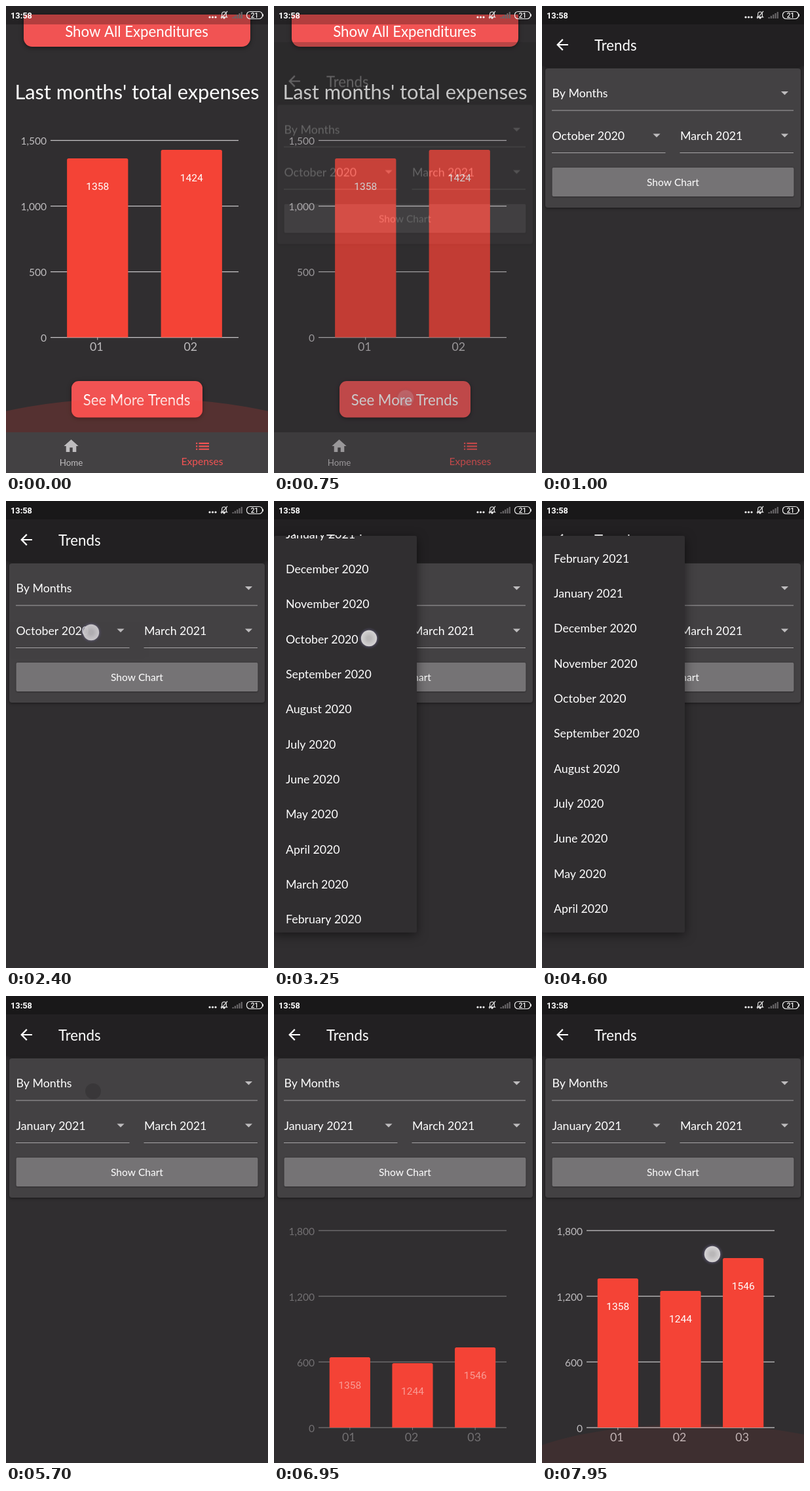
An HTML page with a canvas that plays this animation: 400 px wide and 711 px high, repeating every 8 s.

```html
<!DOCTYPE html>
<html lang="en">
<head>
<meta charset="utf-8">
<title>Expense trends</title>
<style>
  html, body { margin: 0; height: 100%; overflow: hidden; background: #302e30; }
  canvas { display: block; }
</style>
</head>
<body>
<canvas id="stage" width="400" height="711"></canvas>
<script>
const W = 400, H = 711, LOOP = 8000, DP = 400 / 360;
const BG = '#302e30', CARD = '#434143', BUTTON = '#f15353', BAR = '#f44336', GREY = '#bebcbe';
const ICONS = {
  back: 'M20 11H7.83l5.59-5.59L12 4l-8 8 8 8 1.41-1.41L7.83 13H20v-2z',
  home: 'M10 20v-6h4v6h5v-8h3L12 3 2 12h3v8z',
  list: 'M3 13h2v-2H3zm0 4h2v-2H3zm0-8h2V7H3zm4 4h14v-2H7zm0 4h14v-2H7zM7 7v2h14V7z',
  bell: 'M12 22a2 2 0 0 0 2-2h-4a2 2 0 0 0 2 2zM12 4a6 6 0 0 0-6 6v6l-2 2h16l-2-2v-6a6 6 0 0 0-6-6zM4 22L21 2'
};
const MONTHS = 'January February March April May June July August September October November December'.split(' ');

const screen = document.getElementById('stage').getContext('2d');
const buffer = Object.assign(document.createElement('canvas'), { width: W, height: H }).getContext('2d');
let g = screen;

const clamp = v => Math.max(0, Math.min(1, v));
const span = (t, a, b) => clamp((t - a) / (b - a));
const mix = (a, b, k) => a + (b - a) * k;
const smooth = k => k * k * (3 - 2 * k);

function bezier(x1, y1, x2, y2) {
  const at = (a, b, s) => 3 * a * s * (1 - s) ** 2 + 3 * b * s * s * (1 - s) + s ** 3;
  return x => {
    let lo = 0, hi = 1;
    for (let i = 0; i < 20; i++) {
      const mid = (lo + hi) / 2;
      if (at(x1, x2, mid) < x) lo = mid; else hi = mid;
    }
    return at(y1, y2, lo);
  };
}
const fastOutSlowIn = bezier(.4, 0, .2, 1), easeIn = bezier(.42, 0, 1, 1);

// Draws a group with one common opacity.
function layer(alpha, dy, draw) {
  if (alpha <= 0) return;
  g = buffer;
  g.clearRect(0, 0, W, H);
  draw();
  g = screen;
  g.save();
  g.globalAlpha = alpha;
  g.drawImage(buffer.canvas, 0, dy);
  g.restore();
}

function text(s, x, cy, dp, color = '#fff', align = 'left', family = 'Lato', weight = 400) {
  g.font = `${weight} ${dp * DP}px ${family}, sans-serif`;
  g.fillStyle = color;
  g.textAlign = align;
  g.fillText(s, x, cy + .36 * dp * DP);
}

function box(x, y, w, h, color, r = 0, shadow = 0) {
  g.save();
  g.shadowColor = 'rgba(0,0,0,.5)';
  g.shadowBlur = shadow * 2;
  g.shadowOffsetY = shadow / 2;
  g.fillStyle = color;
  g.beginPath();
  g.roundRect(x, y, w, h, r);
  g.fill();
  g.restore();
}

function icon(name, cx, cy, color, scale = DP, stroke = false) {
  g.save();
  g.translate(cx - 12 * scale, cy - 12 * scale);
  g.scale(scale, scale);
  g.fillStyle = g.strokeStyle = color;
  g.lineWidth = 2;
  const path = new Path2D(ICONS[name]);
  if (stroke) g.stroke(path); else g.fill(path);
  g.restore();
}

function chart(values, base, step, k) {
  const left = 68, width = 287, slot = width / values.length, barW = slot * .65;
  g.save();
  g.globalAlpha = k;
  for (let i = 0; i < 4; i++) {
    const y = base - i * 100;
    box(left, y - .5, width, 1.2, '#c6c4c6');
    text((i * step).toLocaleString('en-US'), 62, y + 1, 14, GREY, 'right');
  }
  g.restore();
  values.forEach((v, i) => {
    const cx = left + slot * (i + .5), top = Math.floor(base - v / step * 100 * k);
    box(cx - barW / 2, top, barW, base - top, BAR, [2.5, 2.5, 0, 0]);
    g.save();
    g.globalAlpha = k;
    box(cx - .5, base, 1, 4, '#c6c4c6');
    text('0' + (i + 1), cx - 1.5, base + 14.5, 16, GREY, 'center');
    if (base - top > 50) text(v, cx, top + 42, 14, '#fff', 'center', 'Roboto');
    g.restore();
  });
}

function overscrollGlow(cx, bottom, size, alpha) {
  if (size <= 0) return;
  g.save();
  g.beginPath();
  g.rect(0, 0, W, bottom);
  g.clip();
  g.beginPath();
  g.ellipse(cx, bottom + 100 * size, 300, 300 * size, 0, 0, 7);
  g.fillStyle = `rgba(244,67,54,${alpha})`;
  g.fill();
  g.restore();
}

function touch(x, y, k) {
  if (k <= 0) return;
  g.save();
  g.globalAlpha = k;
  const disc = (r, inner, stops) => {
    const fill = g.createRadialGradient(x, y, inner, x, y, r);
    stops.forEach((c, i) => fill.addColorStop(i, c));
    g.fillStyle = fill;
    g.beginPath();
    g.arc(x, y, r, 0, 7);
    g.fill();
  };
  disc(17, 10, ['rgba(135,130,165,.75)', 'rgba(60,55,80,0)']);
  disc(12.2, 3, ['#b9b7b8', '#d6d4d5']);
  g.restore();
}
const tap = (t, start, release, end) => span(t, start - 50, start) * (1 - span(t, release, end));

function expensesPage(t) {
  box(0, 0, W, H, BG);
  box(27, 13, 346, 49, BUTTON, [0, 0, 13, 13], 3);
  text('Show All Expenditures', 199.5, 39, 20, '#fff', 'center');
  text("Last months' total expenses", 200, 131, 27.7, '#fff', 'center');
  chart([1358, 1424], 504.5, 500, 1);
  const left = (1 - span(t, 50, 600)) ** 2;
  box(100, 571, 200, 55.5, BUTTON, 11, 3);
  text('See More Trends', 199.5, 600, 20, '#fff', 'center');
  overscrollGlow(200, 649, .26 * left, .19 * left);
  box(0, 649, W, 62, CARD);
  icon('home', 99.5, 670, GREY);
  text('Home', 99.5, 695, 12, GREY, 'center');
  icon('list', 300, 670.3, BUTTON);
  text('Expenses', 299.5, 693.5, 14, BUTTON, 'center');
}

function dropdown(label, x, y, w) {
  text(label, x, y, 16);
  box(x - .5, y + 25.5, w, 1, '#a5a3a5');
  const cx = x + w - 14;
  g.fillStyle = GREY;
  g.beginPath();
  g.moveTo(cx - 5.6, y - 3);
  g.lineTo(cx + 5.6, y - 3);
  g.lineTo(cx, y + 2.6);
  g.fill();
}

function trendsPage(t) {
  box(0, 0, W, H, BG);
  box(0, 0, W, 91, '#222022', 0, 4);
  icon('back', 31, 59, '#fff');
  text('Trends', 80, 60, 20);
  box(5, 95, 390, 212, CARD, 4, 2);
  dropdown('By Months', 15.5, 133, 369);
  dropdown(t < 5500 ? 'October 2020' : 'January 2021', 15.5, 197.5, 173.5);
  dropdown('March 2021', 211, 197.5, 173.5);
  box(15.5, 246, 369, 44, '#757375', 2, 1);
  text('Show Chart', 200, 268, 14, '#fff', 'center');
  const k = span(t, 6800, 7120);
  if (k > 0) chart([1358, 1244, 1546], 657, 600, k);
}

const MENU = { top: 53, height: 604, width: 218, row: 48 * DP, count: 27, open: 2400 };
const drag = t => smooth(span(t, 3250, 3650));
const dragY = t => mix(209, 319.5, drag(t));
const scrollAt = t => 145 - Math.max(0, dragY(t) - 229);

function menu(t) {
  const { top, height, width, row, count } = MENU;
  const progress = span(t, MENU.open, MENU.open + 300);
  const grow = fastOutSlowIn(span(progress, .25, .5));
  const y0 = mix(184, top, grow), y1 = mix(184 + row, top + height, grow);
  const scroll = scrollAt(t);
  box(0, y0, width, y1 - y0, BG, 2, 8);
  g.save();
  g.beginPath();
  g.rect(0, y0 - 1, width, y1 - y0);
  g.clip();
  const unit = .5 / (count + 1.5);
  for (let i = 0; i < count; i++) {
    const month = 26 - i, start = .5 + (i + 1) * unit;
    g.globalAlpha = span(progress, start, start + 1.5 * unit);
    text(`${MONTHS[month % 12]} ${2019 + Math.floor(month / 12)}`, 18, top + 8 * DP + row * (i + .5) - scroll, 16);
  }
  g.globalAlpha = span(t, 3370, 3470) * (1 - span(t, 4420, 4600));
  const content = count * row + 16 * DP;
  box(211, top + scroll / content * height, 7, height * height / content, '#c9c7c9');
  g.restore();
}

function statusBar() {
  box(0, 0, W, 28, 'rgba(0,0,0,.26)');
  text('13:58', 7, 14.5, 11.5, '#fff', 'left', 'Roboto', 700);
  for (const x of [311, 315.5, 320]) box(x - 1.6, 15.4, 3.2, 3.2, '#fff', 1.6);
  icon('bell', 333, 13.5, '#eee', .56, true);
  for (let i = 0; i < 5; i++) box(345.5 + i * 3.3, 17 - i * 2, 2.2, 2 + i * 2, '#686668');
  g.strokeStyle = '#eee';
  g.lineWidth = 1.2;
  g.beginPath();
  g.roundRect(367.5, 8.5, 24, 11, 5);
  g.stroke();
  box(392, 12, 1, 4, '#eee', 1);
  text('21', 379.5, 14, 9, '#fff', 'center', 'Roboto', 500);
}

function render(t) {
  const slide = span(t, 619, 919);
  if (slide < 1) expensesPage(t);
  if (slide < 1) layer(easeIn(slide), H / 4 * (1 - fastOutSlowIn(slide)), () => trendsPage(t));
  else trendsPage(t);

  layer(span(t, MENU.open, MENU.open + 75) * (1 - span(t, 5500, 5575)), 0, () => menu(t));

  // A dark mark stays where the list was last tapped.
  if (t >= 5450 && t < 6650) {
    g.fillStyle = 'rgba(0,0,0,.14)';
    g.beginPath();
    g.arc(133, 145, 12, 0, 7);
    g.fill();
  }
  const pull = span(t, 7700, 7950);
  overscrollGlow(230, H, .295 * pull, .065 * pull);
  touch(201, 597, tap(t, 500, 600, 780));
  touch(130, 200, tap(t, 2300, 2380, 2550));
  touch(mix(145, 140.5, drag(t)), dragY(t), tap(t, 3250, 3750, 3950));
  touch(133, 145, tap(t, 5400, 5500, 5700));
  touch(220, 263, tap(t, 6650, 6750, 6950));
  if (t >= 7700) touch(mix(264, 260, pull), mix(510, 393, 1 - (1 - pull) ** 1.5), 1);
  statusBar();
}

function frame() {
  render(performance.now() % LOOP);
  requestAnimationFrame(frame);
}
frame();
</script>
</body>
</html>
```
